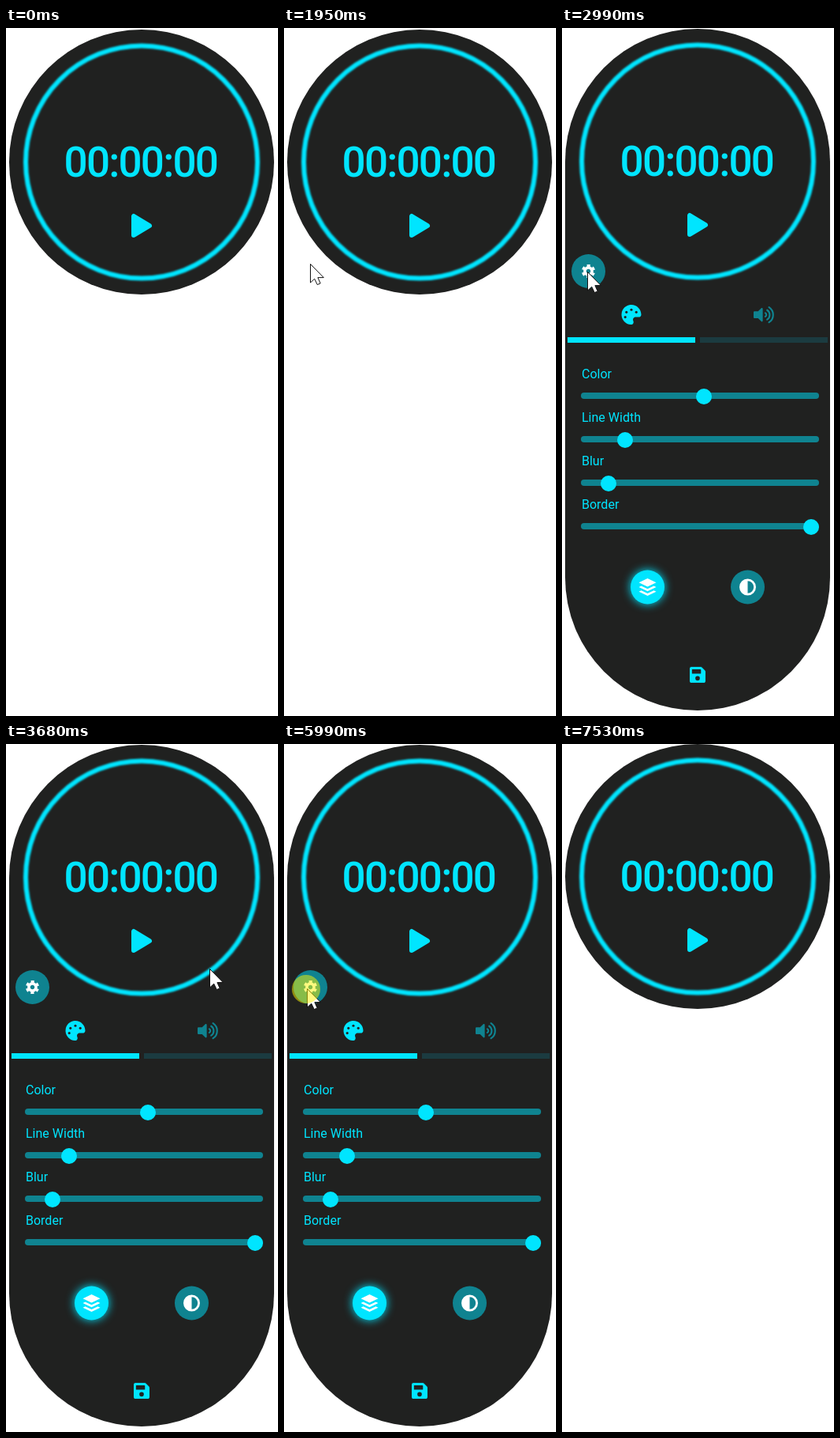
An HTML page for the animation above (7600 ms loop, 345 px wide and 870 px high).

```html
<!DOCTYPE html>
<html lang="en">
<head>
<meta charset="utf-8">
<title>Timer</title>
<style>
  :root { --main: #00e5ff; --dim: #0f8390; --body: #202120; }
  html, body { margin: 0; width: 100%; height: 100%; overflow: hidden; background: #fff; }
  svg { display: block; width: 345px; height: 870px; }
  text { font-family: Roboto, sans-serif; font-size: 16px; fill: var(--main); }
  .time { font-size: 53px; font-weight: 500; letter-spacing: -1.8px; }
  .main { fill: var(--main); }
  .dim { fill: var(--dim); }
  .dark { fill: var(--body); }
  .white { fill: #fff; }
  .line { fill: none; stroke: #fff; }
  .glow { filter: drop-shadow(0 0 6px var(--main)); }

  .face, .body, .panel, .gear, .sync, .cursor, .path, .click {
    animation: 7600ms step-end infinite;
  }
  .face { animation-name: shift; }
  .body { height: 335px; animation-name: grow; }
  .panel { opacity: 0; animation-name: panel; }
  .gear { opacity: 0; animation-name: gear; }
  .sync { opacity: 0; animation-name: sync; }
  .cursor { opacity: 0; animation-name: cursor; }
  .path { animation-name: path; }
  .click { opacity: 0; animation-name: click; }

  @keyframes shift {
    0% { transform: translateY(0); }
    39.34% { transform: translateY(-1px); }
    81.57%, 100% { transform: translateY(-2px); }
  }
  @keyframes grow {
    0% { height: 335px; }
    39.34% { height: 862px; }
    81.57%, 100% { height: 335px; }
  }
  @keyframes panel {
    0% { opacity: 0; }
    39.34% { opacity: 1; }
    81.57%, 100% { opacity: 0; }
  }
  /* buttons appear on hover and linger before fading */
  @keyframes gear {
    0% { opacity: 0; }
    25.65% { opacity: 0; animation-timing-function: steps(3); }
    28.42% { opacity: 1; }
    49.34% { opacity: 1; animation-timing-function: steps(6); }
    54.86% { opacity: 0; }
    73.28% { opacity: 0; animation-timing-function: steps(3); }
    76.05% { opacity: 1; }
    92.63% { opacity: 1; animation-timing-function: steps(7); }
    99.07%, 100% { opacity: 0; }
  }
  @keyframes sync {
    0% { opacity: 0; }
    49.34% { opacity: 0; animation-timing-function: steps(3); }
    52.1% { opacity: 1; }
    55.78% { opacity: 1; animation-timing-function: steps(7); }
    62.23%, 100% { opacity: 0; }
  }
  @keyframes cursor {
    0% { opacity: 0; }
    14.6% { opacity: 1; }
    51.18% { opacity: 0; }
    63.15% { opacity: 1; }
    86.18%, 100% { opacity: 0; }
  }
  @keyframes path {
    0% { transform: translate(335px, 215px); }
    14.6% { transform: translate(335px, 215px); animation-timing-function: steps(5); }
    19.21% { transform: translate(190px, 268px); animation-timing-function: steps(5); }
    23.81% { transform: translate(45px, 286px); animation-timing-function: steps(2); }
    25.65% { transform: translate(33px, 298px); animation-timing-function: steps(3); }
    28.42% { transform: translate(33px, 326px); }
    32.1% { transform: translate(32px, 310px); }
    33.94% { transform: translate(32px, 308px); }
    41.05% { transform: translate(32px, 308px); animation-timing-function: steps(8); }
    48.42% { transform: translate(258px, 284px); animation-timing-function: steps(2); }
    50.26% { transform: translate(323px, 300px); }
    63.15% { transform: translate(335px, 250px); animation-timing-function: steps(7); }
    69.6% { transform: translate(150px, 275px); animation-timing-function: steps(7); }
    76.05% { transform: translate(29px, 309px); }
    85.26%, 100% { transform: translate(25px, 313px); }
  }
  @keyframes click {
    0% { opacity: 0; }
    36.71% { opacity: 1; }
    39.34% { opacity: 0; }
    78.81% { opacity: 1; }
    81.57%, 100% { opacity: 0; }
  }
</style>
</head>
<body>
<svg viewBox="0 0 345 870">
  <defs>
    <filter id="soft" x="-5%" y="-5%" width="110%" height="110%">
      <feGaussianBlur stdDeviation="0.8"/>
    </filter>
    <g id="slider">
      <rect class="dim" x="24" y="461" width="302" height="8" rx="4"/>
    </g>
    <g id="arrow">
      <path class="line" stroke-width="2.6" d="M-7.6 -1.5A7.8 7.8 0 0 1 5.6 -5.4"/>
      <path class="white" d="M9 -9.5V-1.6H1.1Z"/>
    </g>
  </defs>

  <g class="face">
    <rect class="body dark" x="4" y="2" width="336" rx="168"/>
    <circle cx="172" cy="169.5" r="147" fill="none" stroke="var(--main)" stroke-width="6" filter="url(#soft)"/>
    <text class="time" x="73.6" y="188">00:00:00</text>
    <path class="main" stroke="var(--main)" stroke-width="6" stroke-linejoin="round" d="M162 238V262L182 250Z"/>

    <g class="gear" id="gear">
      <g transform="translate(33.5 308.5)">
        <circle class="dim" r="21.5"/>
        <circle class="line" r="4.6" stroke-width="3.6"/>
        <circle class="line" r="7.2" stroke-width="2.8" stroke-dasharray="4 3.54" stroke-dashoffset="2" transform="rotate(30)"/>
      </g>
    </g>
    <g class="sync">
      <g transform="translate(310.5 308.5)">
        <circle class="dim" r="21.5"/>
        <use href="#arrow"/>
        <use href="#arrow" transform="rotate(180)"/>
      </g>
    </g>
  </g>

  <g class="panel">
    <g transform="translate(75.5 350) scale(.0488)">
      <path class="main" d="M204 5C105 24 25 104 5 203c-37 187 132 327 259 307 41-6 61-55 42-92-23-45 10-98 61-98h80c36 0 65-30 65-65C511 97 368-27 204 5z"/>
      <g class="dark">
        <circle cx="96" cy="320" r="32"/>
        <circle cx="128" cy="192" r="32"/>
        <circle cx="256" cy="128" r="32"/>
        <circle cx="384" cy="192" r="32"/>
      </g>
    </g>
    <g transform="translate(243 351) scale(.0455)">
      <path class="dim" d="M215 71l-89 89H24a24 24 0 0 0-24 24v144a24 24 0 0 0 24 24h102l89 89c15 15 41 4 41-17V88c0-21-26-32-41-17z"/>
      <path fill="none" stroke="var(--dim)" stroke-width="48" stroke-linecap="round" d="M327 207a56 56 0 0 1 0 98M378 126a154 154 0 0 1 0 260M430 46a250 250 0 0 1 0 420"/>
    </g>
    <rect class="main" x="7" y="391" width="162" height="7"/>
    <rect x="175" y="391" width="162" height="7" fill="#1b3b40"/>

    <text x="25" y="443">Color</text>
    <text x="25" y="498">Line Width</text>
    <text x="25" y="553">Blur</text>
    <text x="25" y="608">Border</text>
    <use href="#slider"/>
    <use href="#slider" y="55"/>
    <use href="#slider" y="110"/>
    <use href="#slider" y="165"/>
    <g class="main">
      <circle cx="180" cy="466" r="10"/>
      <circle cx="80" cy="521" r="10"/>
      <circle cx="59" cy="576" r="10"/>
      <circle cx="316" cy="631" r="10"/>
    </g>

    <g transform="translate(108.5 707)">
      <circle class="main glow" r="21.5"/>
      <g class="white">
        <path d="M0 -11L11 -5.8L0 -.6L-11 -5.8Z"/>
        <path id="sheet" d="M-11 0L-8 -1.4L0 2.3L8 -1.4L11 0L0 5.2Z"/>
        <use href="#sheet" y="5.7"/>
      </g>
    </g>
    <g transform="translate(235.5 707)">
      <circle class="dim" r="21.5"/>
      <circle class="line" r="9.1" stroke-width="2.8"/>
      <path class="white" d="M0 -9A9 9 0 0 0 0 9Z"/>
    </g>

    <path class="main" fill-rule="evenodd" transform="translate(162 806.5) scale(.0446)" d="M434 130l-84-84A48 48 0 0 0 316 32H48C21 32 0 53 0 80v352c0 27 21 48 48 48h352c27 0 48-21 48-48V164a48 48 0 0 0-14-34zM224 416a64 64 0 1 1 0-128a64 64 0 0 1 0 128zM320 111V212a12 12 0 0 1-12 12H76a12 12 0 0 1-12-12V108a12 12 0 0 1 12-12h229z"/>
  </g>

  <g class="cursor">
    <g class="path">
      <path class="white" stroke="#111" stroke-width="1" d="M.5 .5V24L5.7 19.2L9.3 26.6L13.2 24.9L9.9 17.6H17.3Z"/>
      <circle class="click" cx="-1" cy="1" r="18" fill="rgba(255,245,0,.5)"/>
    </g>
  </g>
</svg>
</body>
</html>
```
